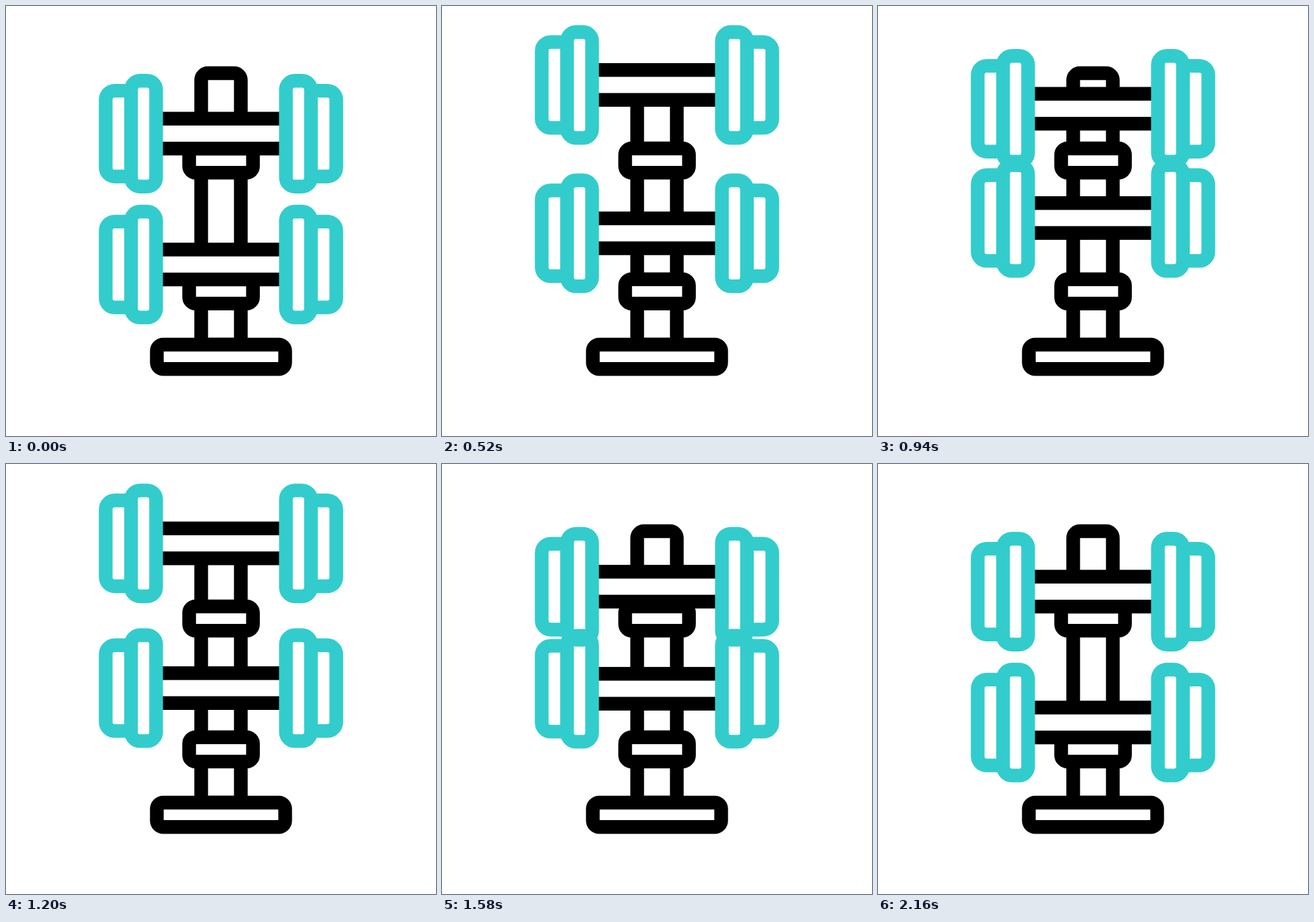
These frames come from a looping animation (640 px wide and 640 px high, 2.4 s). An HTML page with a canvas:

```html
<!DOCTYPE html>
<html lang="en">
<head>
<meta charset="utf-8">
<title>Dumbbell rack</title>
<style>
html, body { margin: 0; width: 100%; height: 100%; overflow: hidden; background: #fff; }
canvas { display: block; width: 640px; height: 640px; }
</style>
</head>
<body>
<canvas id="stage" width="640" height="640"></canvas>
<script>
const ctx = document.getElementById('stage').getContext('2d');
const LOOP = 2400, STEP = 20, LIFT = 75.8, GAP = 194.8;
const BLACK = '#000', TEAL = '#33cccc', WHITE = '#fff';

// Times of the turning points: down, up, down, up, ...
const UPPER = [98, 445, 771, 1111, 1472, 1818, 2160];
const LOWER = [12, 360, 700, 1043, 1391, 1738, 2080];

// Cubic bezier (.75, 0, .25, 1), solved by bisection
function ease(x) {
  let lo = 0, hi = 1;
  for (let i = 0; i < 24; i++) {
    const s = (lo + hi) / 2, r = 1 - s;
    if (2.25 * s * r * r + 0.75 * s * s * r + s * s * s < x) lo = s;
    else hi = s;
  }
  return lo * lo * (3 - 2 * lo);
}

function lift(keys, t) {
  for (let i = 0; i < keys.length - 1; i++) {
    if (t > keys[i] && t <= keys[i + 1]) {
      const e = ease((t - keys[i]) / (keys[i + 1] - keys[i]));
      return LIFT * (i % 2 ? 1 - e : e);
    }
  }
  return 0;
}

function box(x1, y1, x2, y2, r, color, fill) {
  ctx.beginPath();
  ctx.roundRect(x1, y1, x2 - x1, y2 - y1, r);
  if (fill) {
    ctx.fillStyle = fill;
    ctx.fill();
  }
  ctx.strokeStyle = color;
  ctx.stroke();
}

function rack() {
  box(290.5, 100, 349.5, 504, 10, BLACK, WHITE);
  for (const y of [0, GAP]) box(272.6, 212, 367.6, 248.1, 9.5, BLACK, WHITE);
}

function brackets() {
  for (const y of [0, GAP]) box(272.6, 212 + y, 367.6, 248.1 + y, 9.5, BLACK, WHITE);
}

function plates() {
  box(186.1, 111.2, 223.4, 268.8, 13.4, TEAL);
  ctx.beginPath();
  ctx.moveTo(186, 126.1);
  ctx.arcTo(148.4, 126.1, 148.4, 190, 13.4);
  ctx.arcTo(148.4, 253.8, 186, 253.8, 13.4);
  ctx.lineTo(186, 253.8);
  ctx.stroke();
}

function bar(y) {
  ctx.fillStyle = BLACK;
  ctx.fillRect(225, 157.5 + y, 190, 64.9);
  ctx.fillStyle = WHITE;
  ctx.fillRect(225, 177.9 + y, 190, 24.1);
}

function platePair(y) {
  ctx.save();
  ctx.translate(0, y);
  plates();
  ctx.translate(640, 0);
  ctx.scale(-1, 1);
  plates();
  ctx.restore();
}

function draw(t) {
  ctx.fillStyle = WHITE;
  ctx.fillRect(0, 0, 640, 640);
  ctx.lineWidth = 20.4;
  box(290.5, 100, 349.5, 504, 10, BLACK, WHITE);
  brackets();
  box(224.5, 504, 415.5, 540.2, 9.5, BLACK, WHITE);
  const rows = [-lift(UPPER, t), GAP - lift(LOWER, t)];
  rows.forEach(bar);
  rows.forEach(platePair);
}

const start = performance.now();
function tick() {
  const t = (performance.now() - start) % LOOP;
  draw(Math.floor(t / STEP) * STEP);
  requestAnimationFrame(tick);
}
tick();
</script>
</body>
</html>
```
